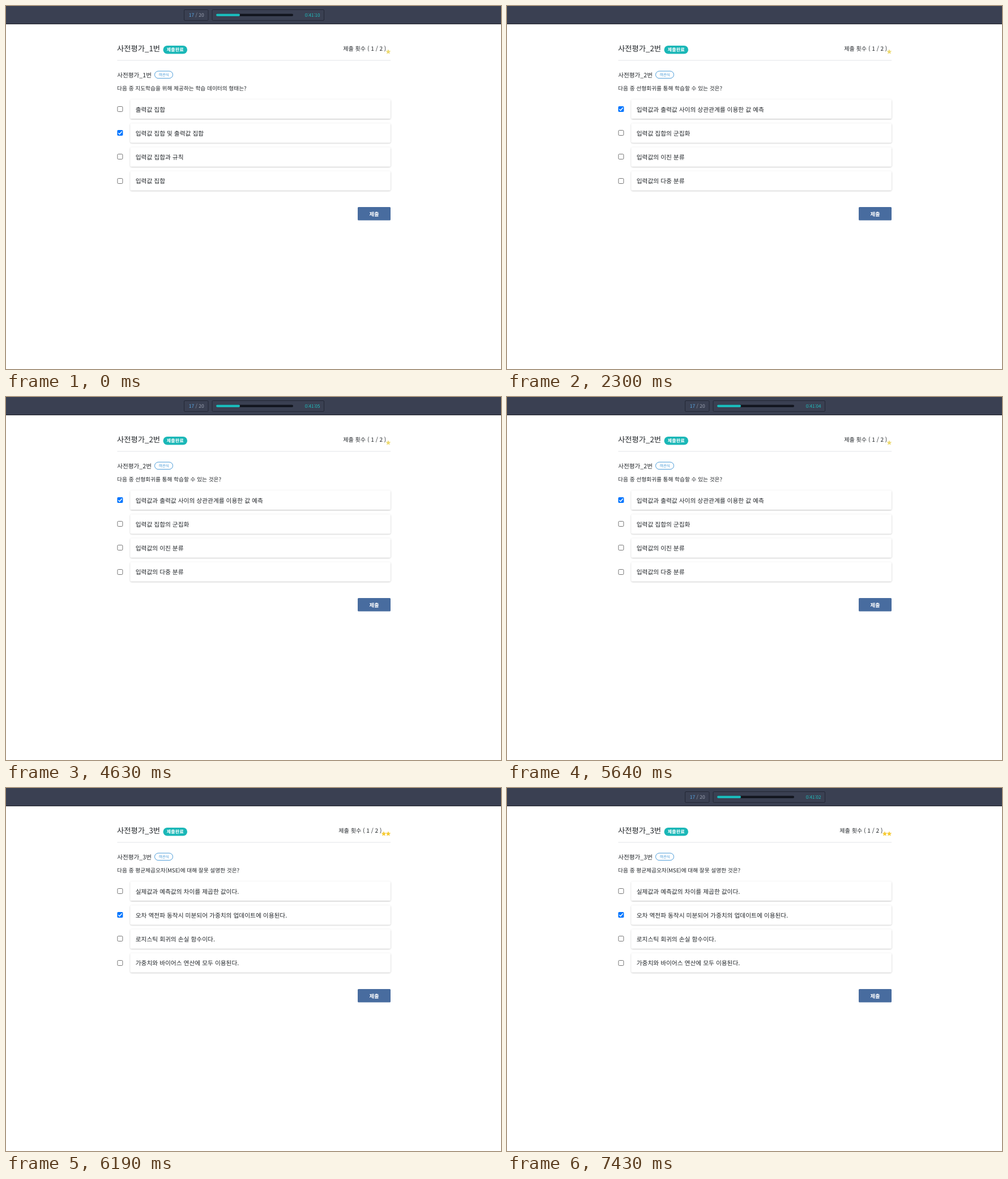
An HTML page for the animation above (8 s loop, 874 px wide and 641 px high).

```html
<!DOCTYPE html>
<html lang="ko">
<head>
<meta charset="utf-8">
<title>Quiz</title>
<style>
html, body { margin: 0; width: 100%; height: 100%; overflow: hidden; background: #fff; }
svg { display: block; width: 874px; height: 641px; }
text {
  font-family: "Noto Sans CJK KR", "Noto Sans KR", "Noto Sans CJK", sans-serif;
  text-rendering: geometricPrecision;
  white-space: pre;
}
</style>
</head>
<body>
<svg id="stage" viewBox="0 0 874 641" xmlns="http://www.w3.org/2000/svg"></svg>
<script>
const LOOP = 8000;
const INK = '#212529', TEAL = '#1ab7b7';
const QUESTIONS = [
  {
    prompt: '다음 중 지도학습을 위해 제공하는 학습 데이터의 형태는?',
    options: ['출력값 집합', '입력값 집합 및 출력값 집합', '입력값 집합과 규칙', '입력값 집합'],
    checked: 1, stars: 1, starColor: '#ecd970'
  },
  {
    prompt: '다음 중 선형회귀를 통해 학습할 수 있는 것은?',
    options: ['입력값과 출력값 사이의 상관관계를 이용한 값 예측', '입력값 집합의 군집화', '입력값의 이진 분류', '입력값의 다중 분류'],
    checked: 0, stars: 1, starColor: '#ecd970'
  },
  {
    prompt: '다음 중 평균제곱오차(MSE)에 대해 잘못 설명한 것은?',
    options: ['실제값과 예측값의 차이를 제곱한 값이다.', '오차 역전파 동작시 미분되어 가중치의 업데이트에 이용된다.', '로지스틱 회귀의 손실 함수이다.', '가중치와 바이어스 연산에 모두 이용된다.'],
    checked: 1, stars: 2, starColor: '#f6cb35'
  }
];
// Start time, question index (-1 = blank page), seconds on the timer (null = hidden)
const TIMELINE = [
  [0, 0, 10], [360, 0, 9], [1370, 0, 8], [2300, 1, null],
  [3620, 1, 6], [4630, 1, 5], [5640, 1, 4],
  [6100, -1, null], [6190, 2, null], [7430, 2, 2]
];

const stage = document.getElementById('stage');

const attrs = o => Object.entries(o).map(([k, v]) => ` ${k}="${v}"`).join('');
const rect = (x, y, width, height, fill, more = {}) =>
  `<rect${attrs({ x, y, width, height, fill, ...more })}/>`;
const text = (s, x, y, size, fill = INK, more = {}) =>
  `<text${attrs({ x, y, 'font-size': size, fill, ...more })}>${s}</text>`;

function star(cx, cy, fill) {
  const points = Array.from({ length: 10 }, (_, i) => {
    const r = i % 2 ? 2.1 : 4.7, a = Math.PI * (i / 5 - 0.5);
    return `${(cx + r * Math.cos(a)).toFixed(2)},${(cy + r * Math.sin(a)).toFixed(2)}`;
  });
  return `<polygon${attrs({ points: points.join(' '), fill })}/>`;
}

function checkbox(x, y, on) {
  if (!on) return rect(x + .5, y + .5, 9, 9, '#fff', { rx: 1.5, stroke: '#767676', 'stroke-width': 1 });
  return rect(x, y, 10, 10, '#0075ff', { rx: 1.7 }) +
    `<path d="M${x + 2} ${y + 5.2}l2.2 2.2l4-5" fill="none" stroke="#fff" stroke-width="1.6"/>`;
}

function option(label, i, on) {
  const y = 165 + i * 42.2;
  return checkbox(196.4, Math.round(y + 12), on) +
    rect(219.5, y, 459.5, 34, '#fff', { rx: 2, filter: 'url(#shadow)' }) +
    text(label, 228.7, y + 21.6, 10.72);
}

function header() {
  const frame = { rx: 1.5, stroke: '#232735', 'stroke-width': 1 };
  return rect(0, 0, 874, 31, '#3a4052') + rect(0, 31, 874, 1.2, '#171a24') +
    '<g id="status">' +
    rect(314.5, 6.5, 42.5, 19, 'none', frame) +
    text('<tspan fill="#58a6e4">17</tspan> / 20', 322.8, 19.2, 8.5, '#9aa1b0') +
    rect(364, 6.5, 197.5, 19, 'none', frame) +
    rect(371, 13.8, 136, 4.2, '#13161f', { rx: 2 }) +
    rect(371, 13.8, 42, 4.2, '#1abcbc', { rx: 2 }) +
    text('', 527.7, 19.1, 8.05, '#1fc0c0', { id: 'timer' }) +
    '</g>';
}

function page(q, i) {
  const title = `사전평가_${i + 1}번`;
  const stars = Array.from({ length: q.stars }, (_, n) => star(674.9 - n * 7.9, 80.9, q.starColor));
  return `<g class="page">` +
    text(title, 196.1, 80.2, 13.3, INK, { 'font-weight': 500 }) +
    rect(277.5, 70, 42.5, 14.5, TEAL, { rx: 7.25 }) +
    text('제출완료', 298.7, 80.4, 8.1, '#fff', { 'font-weight': 700, 'text-anchor': 'middle' }) +
    text('제출 횟수 ( 1 / 2 )', 679.2 - q.stars * 7.9, 79.3, 10.1, INK, { 'text-anchor': 'end' }) +
    stars.join('') +
    rect(196.4, 95.5, 482.6, 1, '#e2e4e8') +
    text(title, 196.2, 126, 10.65, INK, { 'font-weight': 500 }) +
    rect(262.5, 115, 32, 12.7, '#fff', { rx: 6.35, stroke: '#4a9bd8', 'stroke-width': 1 }) +
    text('객관식', 278.6, 123.9, 6.8, '#4a9bd8', { 'text-anchor': 'middle' }) +
    text(q.prompt, 196.1, 149.1, 9.7) +
    q.options.map((label, n) => option(label, n, n === q.checked)).join('') +
    rect(621, 355, 58, 23.5, '#486c9f', { rx: 1.5 }) +
    text('제출', 650.1, 370.6, 9.3, '#fff', { 'font-weight': 700, 'text-anchor': 'middle' }) +
    '</g>';
}

stage.innerHTML =
  `<defs><filter id="shadow" x="-2%" y="-20%" width="104%" height="140%">
    <feDropShadow dx="0" dy="0.8" stdDeviation="0.9" flood-color="#000" flood-opacity="0.28"/>
  </filter></defs>` +
  rect(0, 0, 874, 641, '#fff') + header() + QUESTIONS.map(page).join('') +
  rect(0, 0, 874, 641, '#f1f3f8', { id: 'blank' });

const status = document.getElementById('status');
const timer = document.getElementById('timer');
const blank = document.getElementById('blank');
const pages = [...stage.querySelectorAll('.page')];
const show = (el, on) => el.setAttribute('visibility', on ? 'visible' : 'hidden');

function render(ms) {
  const [, question, seconds] = TIMELINE.filter(([start]) => start <= ms).pop();
  pages.forEach((el, i) => show(el, i === question));
  show(blank, question < 0);
  show(status, seconds !== null);
  if (seconds !== null) timer.textContent = `0:41:${String(seconds).padStart(2, '0')}`;
}

const begin = performance.now();
function tick() {
  render((performance.now() - begin) % LOOP);
  requestAnimationFrame(tick);
}
tick();
</script>
</body>
</html>
```
